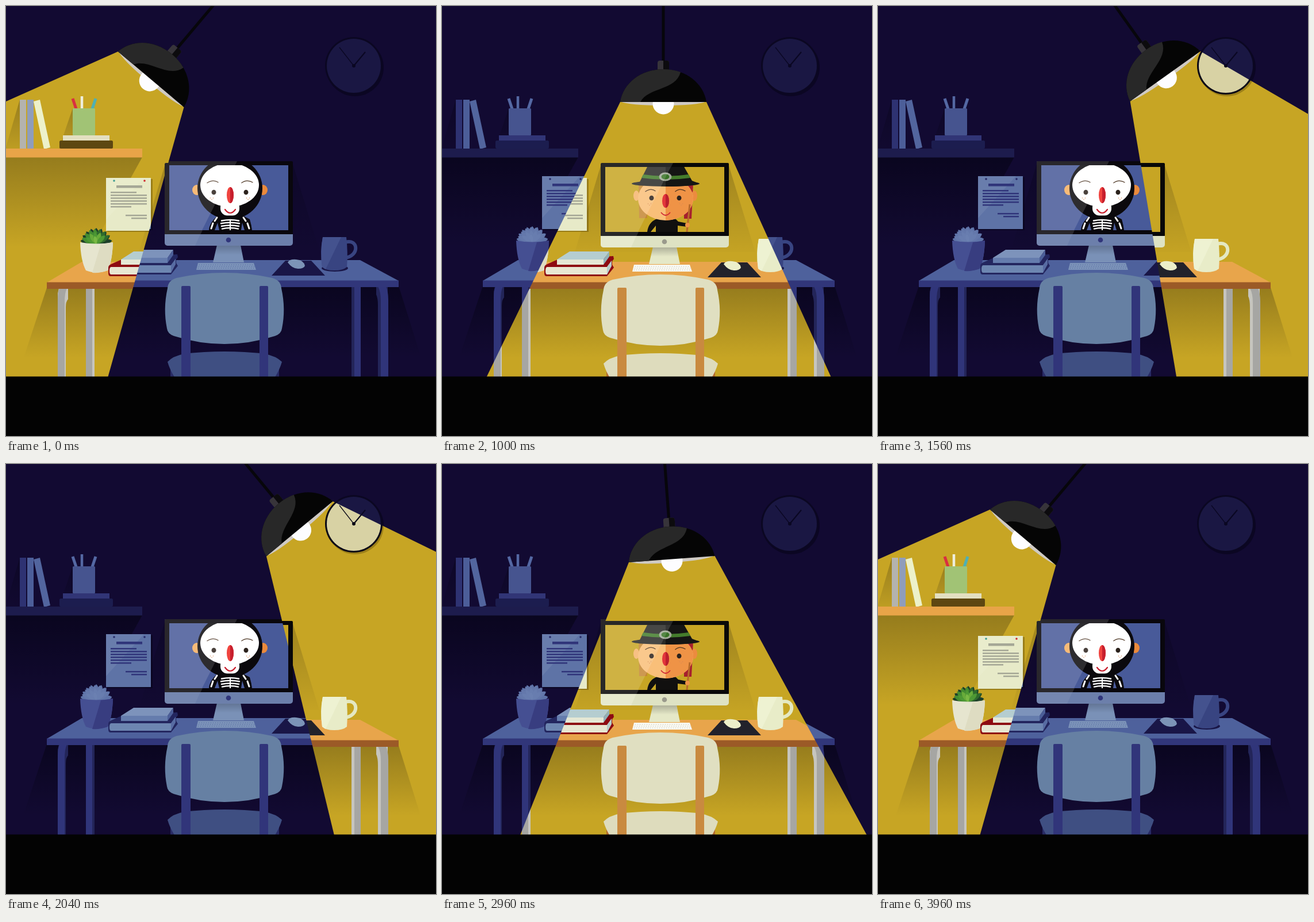
Write an HTML page with a canvas that moves like this. It is 748 px wide and 748 px high and loops after 4000 ms.

```html
<!DOCTYPE html>
<html lang="en">
<head>
<meta charset="utf-8">
<title>Desk lamp</title>
<style>
  html, body { margin: 0; width: 100%; height: 100%; overflow: hidden; background: #030303; }
  canvas { display: block; width: 748px; height: 748px; }
</style>
</head>
<body>
<canvas id="stage" width="748" height="748"></canvas>
<script>
const SIZE = 748, FLOOR = 644.5, LOOP = 4000, STEP = 40;
const SWING_LEFT = 40.1, SWING_RIGHT = 39.6, EASE = 2.75;
const stage = document.getElementById('stage').getContext('2d');
let g = stage;

// Drawing helpers, all working on the current context g
function fill(color, d) {
  g.fillStyle = color;
  g.fill(new Path2D(d));
}
function line(color, width, d, cap = 'butt') {
  g.strokeStyle = color;
  g.lineWidth = width;
  g.lineCap = cap;
  g.stroke(new Path2D(d));
}
function rect(color, x, y, w, h, r = 0) {
  g.fillStyle = color;
  g.beginPath();
  g.roundRect(x, y, w, h, r);
  g.fill();
}
function oval(color, x, y, rx, ry = rx, from = 0, to = Math.PI * 2) {
  g.fillStyle = color;
  g.beginPath();
  g.ellipse(x, y, rx, ry, 0, from, to);
  g.fill();
}
function halves(left, right, x, y, rx, ry) {
  oval(left, x, y, rx, ry);
  oval(right, x, y, rx, ry, -Math.PI / 2, Math.PI / 2);
}
function shade(alpha, top, bottom, d) {
  const fade = g.createLinearGradient(0, top, 0, bottom);
  fade.addColorStop(0, `rgba(0,0,8,${alpha})`);
  fade.addColorStop(1, 'rgba(0,0,8,0)');
  fill(fade, d);
}
function clipped(x, y, w, h, draw) {
  g.save();
  g.beginPath();
  g.rect(x, y, w, h);
  g.clip();
  draw();
  g.restore();
}

function clock(c) {
  oval(c('rgba(60,45,0,.3)', 'rgba(8,4,25,.6)'), 607, 107, 50);
  oval(c('#080716', '#0b0722'), 605, 104, 50);
  oval(c('#d8d2a4', '#1a1743'), 605, 104, 47);
  const hand = c('#080716', '#0a0722');
  line(hand, 1.3, 'M605 104L580 72');
  line(hand, 2, 'M605 104L625 80');
  oval(hand, 605, 104, 3);
}

function shelf(c) {
  shade(c(.25, .45), 262, 420, 'M0 263H237L150 420H0Z');
  shade(c(.27, .3), 150, 270, 'M24 163L0 245V248H24Z');
  shade(c(.27, .3), 160, 270, 'M116 178L92 248H116Z');
  rect(c('#b4b3ae', '#2e3272'), 24, 163, 11, 85);
  rect(c('#8f9dbb', '#4c5e99'), 37, 163, 11, 85);
  fill(c('#edf1ca', '#52659e'), 'M48 166L59 163L77 246L66 249Z');
  line(c('#d92f40', '#5468a3'), 5, 'M116 161L122 179');
  line(c('#eeeedd', '#5468a3'), 4.5, 'M132 157V179');
  line(c('#4fb0b3', '#5468a3'), 5, 'M156 161L150 179');
  rect(c('#a1c375', '#46548f'), 116, 178, 39, 47, 1.5);
  rect(c('#e3dfc0', '#313576'), 99, 225, 81, 10);
  rect(c('#5d4711', '#1c1d4f'), 93, 234, 93, 14, 2.5);
  rect(c('#e8a448', '#1d1c4d'), 0, 248, 237, 15.5);
}

function paper(c) {
  rect(c('rgba(70,50,0,.35)', 'rgba(4,2,20,.5)'), 176, 301, 79, 92);
  rect(c('#e7eac8', '#5e73a6'), 174, 299, 78, 92);
  fill('rgba(255,255,255,.07)', 'M174 299H240L174 372Z');
  const ink = c('#a5a796', '#30357a');
  rect(ink, 192, 312, 45, 4.5);
  const rows = [[182, 323, 45], [182, 328, 63], [182, 333, 63], [182, 338, 63],
                [182, 343, 63], [182, 348, 36], [208, 363, 37], [218, 368, 27]];
  for (const [x, y, w] of rows) rect(ink, x, y, w, 2.5);
  oval(c('#3d9c90', '#272a68'), 188, 304, 1.8);
  oval(c('#d0282e', '#272a68'), 241, 304, 1.8);
}

function leaf(color, angle, length, width) {
  g.save();
  g.translate(157, 414);
  g.rotate(angle);
  fill(color, `M0 0C${width} ${-length * .35} ${width} ${-length * .75} 0 ${-length}C${-width} ${-length * .75} ${-width} ${-length * .35} 0 0Z`);
  g.restore();
}

function plant(c) {
  for (let i = -4; i <= 4; i++) leaf(c('#1d4029', '#5e73a8'), i * .34, 28, 7);
  for (let i = -3; i <= 3; i++) leaf(c(i > 0 ? '#2f6b2c' : '#448c31', '#6478ab'), i * .36 - .1, 27, 6);
  for (let i = -2; i <= 2; i++) leaf(c(i % 2 ? '#68ab3a' : '#4d9834', '#687daf'), i * .45 - .1, 21, 5);
  leaf(c('#79b944', '#6b80b1'), -.2, 14, 4);
  fill(c('#e6e5cf', '#454f92'), 'M129 411Q157 416 186 411Q185 443 177 460Q157 467 139 460Q130 443 129 411Z');
  fill(c('#dedcc2', '#383d80'), 'M165 414Q177 413 186 411Q185 443 177 460Q164 465 150 464Z');
}

function desk(c) {
  shade(c(.25, .45), 488, c(612, 615), 'M71 490H683L722 614H30Z');
  const leg = c('#a6a6a3', '#30357a'), side = c('#c6c5be', '#232559');
  fill(side, 'M92 491H108V510Q104 514 104 524V660H90V500Z');
  fill(leg, 'M93 491H106Q102 499 102 515V660H90V510Q90 498 93 491Z');
  rect(side, 139, 491, 15, 160);
  rect(leg, 139, 491, 11, 160);
  rect(side, 601, 491, 16, 160);
  rect(leg, 606, 491, 11, 160);
  fill(side, 'M644 491H664V660H647V524Q647 511 644 505Z');
  fill(leg, 'M647 491H661Q665 500 665 514V660H652V516Q652 500 647 491Z');
  fill(c('#e8a54b', '#4e619c'), 'M71 481L132 445H616L683 481Z');
  rect(c('#9b5a27', '#31367a'), 71, 480.5, 612, 11.5);
}

function books(c) {
  fill(c('#8e0b12', '#23265f'), 'M178 455Q178 451 183 449L201 441L298 435L299 440L296 444V450L299 455L287 470H182Q178 470 178 465Z');
  fill(c('#e8e7d2', '#6d86b1'), 'M183 454H287L295 443V452L287 467H183Q180 467 180 461Q180 454 183 454Z');
  fill(c('#b6ccc9', '#576ba2'), 'M287 454L295 443V452L287 467Z');
  fill(c('#b5cdd0', '#7d93bb'), 'M200 441L222 427H291L281 441Z');
  rect(c('#e5e8d5', '#657cad'), 200, 441, 81, 9);
  fill(c('#92b1b8', '#4c5f99'), 'M281 441L291 427V436L281 450Z');
}

function witch() {
  fill('#c58734', 'M342 308H357V369H343Z');
  fill('#a61f2d', 'M421 308H437L434 370H421Z');
  oval('#f6b66e', 338, 330, 5, 9);
  oval('#ec8b3f', 439, 330, 5, 9);
  fill('#11100f', 'M374 368H404L411 375L426 378V384L410 382V393H372V382L363 393H357Q359 376 374 370Z');
  halves('#f9bf79', '#ef9346', 389, 335, 48, 38);
  line('#b86a2b', 3, 'M431 345L426 393');
  oval('#ef9346', 427, 381, 4);
  features(388.5, 334, 24, 321, 9);
  halves('#e3353b', '#bb1f2e', 389, 339, 6, 12);
  line('#cf2936', 1.8, 'M381 359Q389 369 397 359');
  oval('#2a2a27', 389, 309, 59, 5);
  fill('#2a2a27', 'M343 308L358 278H420L435 308Z');
  fill('#151514', 'M389 278H420L435 304L448 309Q435 314 389 314Z');
  fill('#447c2c', 'M350 293Q389 299 429 293L432 299Q389 305 347 299Z');
  oval('#a1aa97', 388.5, 297, 11, 7.5);
  oval('#397326', 388.5, 297, 7, 4.5);
}

function features(x, y, gap, brow, half) {
  for (const s of [-1, 1]) {
    oval('#2c221c', x + s * gap, y, 4, 4.3);
    const b = x + s * (gap + 2);
    line('#4a3320', 1.2, `M${b - half} ${brow + 2}Q${b - s} ${brow - 5} ${b + half} ${brow + 1}`);
    for (let i = 0; i < 3; i++) oval('#d98a55', x + s * (gap + 1 + i * 2.5), y + 10 + (i % 2) * 2.5, .8);
  }
}

function skeleton() {
  oval('#f6b062', 332, 323, 8, 9);
  oval('#ea8a3c', 447, 323, 8, 9);
  fill('#0b090d', 'M372 365H407L424 374Q427 384 428 393H353Q354 378 372 365Z');
  fill('#4b5d9d', 'M368 380L371 393H363ZM411 380L415 393H409Z');
  oval('#0b090d', 389.5, 320, 56.5, 54);
  oval('#ffffff', 389, 314.5, 51, 38);
  rect('#ffffff', 373, 341, 33, 26.5, 12);
  features(389.5, 327, 28, 309, 10);
  halves('#f0443f', '#c71f2d', 390, 332, 6, 14);
  line('#c71f2d', 2.2, 'M381 357Q390 369 399 357', 'round');
  line('#ffffff', 2, 'M390 374V393');
  for (let i = 0; i < 4; i++) {
    const y = 376.5 + i * 4.7, w = 16 - Math.abs(i - 1);
    line('#ffffff', 2.5, `M${390 - w} ${y}Q390 ${y - 3} ${390 + w} ${y}`, 'round');
  }
  line('#ffffff', 3, 'M367 371L363 377M360 381L357 390M413 371L417 377M420 381L423 390', 'round');
}

function monitorShade(c) {
  shade(c(.2, .22), 275, 440, 'M276 278L231 428H545L499 278Z');
}

function monitor(c) {
  fill(c('#e5e8c7', '#7a91b7'), 'M367 419H408L414 449H360Z');
  shade(c(.25, .2), 419, 436, 'M367 419H408L411 436H363Z');
  rect(c('#080808', '#09070d'), 276, 273, 223, 128, 2);
  fill('rgba(255,255,255,.13)', 'M276 273H402L338 401H276Z');
  rect(c('#c7a524', '#485a99'), 284, 280, 207, 113);
  clipped(284, 280, 207, 113, c.night ? skeleton : witch);
  fill('rgba(255,255,255,.14)', 'M284 280H398L341 393H284Z');
  rect(c('#dee2c3', '#6c7fab'), 276, 400, 223, 20, [0, 0, 5, 5]);
  fill(c('rgba(255,255,240,.25)', 'rgba(255,255,255,.06)'), 'M276 400H338L329 420H281Q276 420 276 415Z');
  oval(c('#9a9a8c', '#30357a'), 387, 410, 4.3);
}

function keyboard(c) {
  fill(c('#f8f8f1', '#7b92b8'), 'M334 450H431L435 462H331Z');
  const gap = c('#c9c9bf', '#586ca4');
  for (let row = 0; row < 3; row++) {
    for (let x = 336 - row; x < 431 + row; x += 4) rect(gap, x, 452.5 + row * 3, 1, 1.2);
  }
}

function mouseAndMug(c) {
  fill(c('#22222b', '#191647'), 'M486 446H531L555 472H462Z');
  fill(c('#ecefca', '#7c94b7'), 'M490 449Q493 443 505 444Q518 445 520 455Q518 460 508 460Q498 460 490 449Z');
  if (c.night) oval('#191647', 572, 459, 23, 6);
  line(c('#e4e8c3', '#384481'), 6, 'M590 414C613 407 616 438 589 441');
  fill(c('#e8ecc8', '#384481'), 'M551 405H592Q595 432 593 457Q586 463 571 463Q556 463 550 457Q546 430 551 405Z');
  fill(c('#eef2d2', '#44528e'), 'M551 405H583L556 461L550 457Q546 430 551 405Z');
}

function chair(c) {
  fill(c('#b56a2c', '#282b65'), 'M286 628L296 644V660H286ZM475 628L465 644V660H475Z');
  fill(c('#dedcbd', '#3f4f82'), 'M281 622Q290 612 310 608Q380 600 450 608Q470 612 480 622Q476 636 467 650H294Q285 636 281 622Z');
  fill(c('#e0dfc1', '#6680a3'), 'M281 494Q282 480 297 476Q380 458 463 476Q478 480 479 494Q487 530 480 564Q479 573 468 577Q380 605 292 577Q281 573 280 564Q273 530 281 494Z');
  const post = c('#c98a40', '#31357a');
  rect(post, 305, 490, 16, 165, [2, 2, 0, 0]);
  rect(post, 441, 490, 15, 165, [2, 2, 0, 0]);
}

function render(night) {
  const canvas = document.createElement('canvas');
  canvas.width = canvas.height = SIZE;
  g = canvas.getContext('2d');
  const c = (day, dark) => night ? dark : day;
  c.night = night;
  rect(c('#c7a524', '#120a32'), 0, 0, SIZE, SIZE);
  clock(c);
  shelf(c);
  // Unlit furniture sits slightly higher than its lit twin
  if (night) g.translate(0, -3);
  for (const part of [monitorShade, paper, desk, monitor, plant, books, keyboard, mouseAndMug, chair]) part(c);
  return canvas;
}

function lamp() {
  line('#07060b', 5, 'M0 -70V-330');
  fill('#cfcac4', 'M-75 -1H75Q60 6 0 6Q-60 6 -75 -1Z');
  oval('#fdfdff', 0, 3, 18.5);
  rect('#37343a', -10, -72, 20, 20, 4);
  rect('#0c0b0e', 0, -72, 10, 20, [0, 4, 0, 0]);
  fill('#050505', 'M-75 0C-70 -32 -40 -57 0 -57C40 -57 70 -32 75 0Z');
  fill('#282828', 'M-75 0C-70 -32 -40 -57 0 -57Q16 -57 30 -52C22 -20 -26 -26 -40 0Z');
}

// Eased swing from left to right and back, in radians
function angleAt(time) {
  const half = LOOP / 2;
  const p = time % half / half;
  const ease = p < .5 ? .5 * (2 * p) ** EASE : 1 - .5 * (2 - 2 * p) ** EASE;
  const turn = (1 - 2 * ease) * (time < half ? 1 : -1);
  return turn * (turn > 0 ? SWING_LEFT : SWING_RIGHT) * Math.PI / 180;
}

const nightRoom = render(true);
const litRoom = render(false);
g = stage;

const beam = new Path2D('M-75 0L-804 1500H754.5L75 0Z');

function hang(angle) {
  g.translate(372.5, -34.7);
  g.rotate(angle);
  g.translate(12.5, 201.7);
}

function frame(now) {
  const angle = angleAt(Math.floor(now % LOOP / STEP) * STEP);
  g.drawImage(nightRoom, 0, 0);
  g.save();
  hang(angle);
  g.clip(beam);
  g.setTransform(1, 0, 0, 1, 0, 0);
  g.drawImage(litRoom, 0, 0);
  g.restore();
  g.save();
  hang(angle);
  lamp();
  g.restore();
  rect('#030303', 0, FLOOR, SIZE, SIZE - FLOOR);
}

const start = performance.now();
function tick() {
  frame(performance.now() - start);
  requestAnimationFrame(tick);
}
tick();
</script>
</body>
</html>
```
